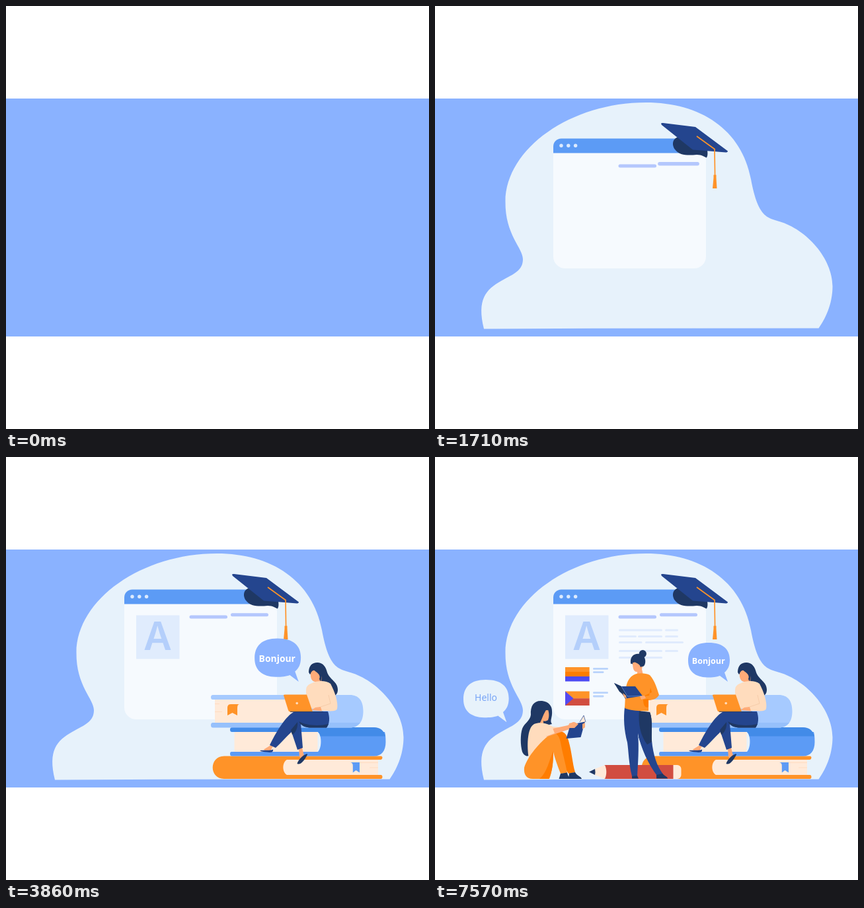
These frames come from a looping animation (640x640 px, 10 s). An HTML page with a canvas:

```html
<!DOCTYPE html>
<html lang="en">
<head>
<meta charset="utf-8">
<title>Language learning</title>
<style>
  html, body { margin: 0; width: 100%; height: 100%; overflow: hidden; background: #fff; }
  canvas { display: block; width: 640px; height: 640px; }
</style>
</head>
<body>
<canvas id="stage" width="640" height="640"></canvas>
<script>
const ctx = document.getElementById('stage').getContext('2d');

const SKY = '#8ab2ff', MIST = '#e7f2fb', WHITE = '#f6fafe';
const BLUE = '#5c9bf5', DEEP_BLUE = '#428be8', PALE_BLUE = '#a6caff';
const NAVY = '#24458e', INK = '#1f3864';
const ORANGE = '#ff9328', DARK_ORANGE = '#ff7d00', RED = '#d14d40', VIOLET = '#544af0';
const PAPER = '#ffead9', CREAM = '#ffdcbd', SKIN = '#ffab78';
const BAR = '#b4c7fd', TEXT_BAR = '#e0ebfd';

const shape = (color, d) => { ctx.fillStyle = color; ctx.fill(new Path2D(d)); };
const line = (color, width, d) => {
  ctx.strokeStyle = color;
  ctx.lineWidth = width;
  ctx.stroke(new Path2D(d));
};
const box = (color, x, y, w, h, r = 0) => {
  ctx.fillStyle = color;
  ctx.beginPath();
  ctx.roundRect(x, y, w, h, r);
  ctx.fill();
};
const dot = (color, x, y, r) => {
  ctx.fillStyle = color;
  ctx.beginPath();
  ctx.arc(x, y, r, 0, Math.PI * 2);
  ctx.fill();
};
const label = (text, color, font, x, y) => {
  ctx.font = font;
  ctx.fillStyle = color;
  ctx.textAlign = 'center';
  ctx.fillText(text, x, y);
};
const textRow = (y, ...spans) => {
  for (const [from, to] of spans) box(TEXT_BAR, from, y, to - from, 3, 1.5);
};

function cloud() {
  shape(MIST, `M74 488.5C63 444 77 429 100 416C120 405 133 400 133 383C133 366 106 346 106.5 296
    C107 215 206 146 319 146C402 146 464 187 478 262C489 322 504 320 521 326
    C562 338 601.5 382 601.5 424C601.5 452 590 474 580.5 487.5L240 487.7Z`);
}

function browser() {
  box(WHITE, 179, 200.5, 231, 196.5, [12, 12, 18, 18]);
  box(BLUE, 179, 200.5, 231, 22, [12, 12, 0, 0]);
  for (const x of [191, 201.8, 212.6]) dot('#dceafe', x, 211.3, 2.7);
}

function cap() {
  shape(INK, `M369 198C359 200 358 210 363 217C370 227 384 226 396 225C404 225 407 228 411 229.5
    C413 226 412.5 222 412 218L390 216Z`);
  shape(NAVY, 'M342 178Q342.5 176.5 345 177L394 183L443 219.5Q443 221.8 440 221.5L390 217.5L343 180Z');
  line(ORANGE, 1.7, 'M396 197L423 216.5L423.6 257');
  shape(ORANGE, 'M421.5 255.5H425.5V260L426.5 276H420L421.5 260Z');
}

function letterCard() {
  box('#e0ecfd', 197, 239.5, 65.5, 66);
  label('A', '#b4cffb', '600 59px Inter, sans-serif', 229.5, 292);
}

function paragraphTop() {
  textRow(260.5, [278, 344], [348, 368]);
  textRow(270, [278, 305], [307, 344], [348, 368]);
  textRow(279, [278, 313.5], [318, 376]);
}

function paragraphBottom() {
  textRow(292, [278, 344], [348, 368]);
  textRow(302, [278, 344]);
}

function orangeBook() {
  shape(ORANGE, 'M330 452.5H567Q569.5 452.5 569.5 455T567 458H428V481H567Q569.5 481 569.5 484T567 487H330C307 487 307 452.5 330 452.5Z');
  shape(PAPER, 'M425 458H563V481H425C417.5 477 417.5 462 425 458Z');
  line('#ffd6b8', 0.7, 'M535 462.5H563M550 470H563');
  shape(BLUE, 'M521 462H535V477.5L529.5 474L524.8 477.5V467C524.8 464 523.5 462.5 521 462Z');
}

function blueBook() {
  box(PAPER, 345.5, 415, 126, 32);
  shape(BLUE, 'M342 446H472C478 440 478 421 472 416H573Q574.5 421 574.5 431C574.5 445 568 452.5 557 452.5H342Q339 452.5 339 449T342 446Z');
  shape(DEEP_BLUE, 'M342 409H557C566 409 572 414 574 422.5H475.5Q474.5 418 472 416H342Q339 416 339 412.5T342 409Z');
}

function lightBook() {
  box(PAPER, 316, 366, 128, 37);
  shape(PALE_BLUE, 'M313 360H520C534 360 540.5 369 540.5 384.5S534 409.5 520 409.5H440V402C447 396 447 373 440 367H313Q310 367 310 363.5T313 360Z');
  shape('#96c0fb', 'M313 402H536C532 407 527 409.5 520 409.5H313Q310 409.5 310 405.7T313 402Z');
  line('#ffd6b8', 0.7, 'M316 373.5H323M316 385.5H327');
  shape(ORANGE, 'M353 374H340C336 374 335 377 335 380V391L342.5 387L350 391V380C350 376 351 374 353 374Z');
}

function laptopWoman() {
  shape(INK, `M458 326C458 315 464 310.5 472 311C480 311.5 484 318 486 326C490 337 502 340 502 352
    C502 358 499 361 496 361L474 342Z`);
  shape(SKIN, 'M405 435L400 445C396 446 392 445 390 442.5L399 437ZM443 441L448 440L451 452L446 457L444 453Z');
  shape(NAVY, 'M384 444C390 443 398 445 404 442.5C405 447 400 447.5 395 446.5C390 446 386 446 384 444Z');
  shape(INK, 'M455.5 449C449 451 442 458 440.5 464C446 467 453 457 456 450Z');
  shape(NAVY, 'M430 410L441 443L449 440L446 403C448 408 456 409.5 462 409.5H485C490 404 490 393 487 385H437C424 390 407 419 399 436L408 440C416 433 424 423 432 416Z');
  shape(INK, 'M443 400C446 407 454 409.5 462 409.5H485L488 404C474 407 456 407 443 400ZM431 413L441 401C442 409 438 418 433 420Z');
  shape(SKIN, 'M463 324C470 320 477 321 478 328L477 341C474 345 469 345 468 340C463 340 460 334 461 327Z');
  shape(INK, 'M459 329C458 317 463 311 472 312C481 313 481 322 479 327L476 340L474 336C477 329 470 326 464 321Z');
  shape(CREAM, 'M463 342C471 338 485 338 491 343C497 354 503 371 501 381C499 386 488 384 478 384L461 380C456 373 452 354 455 348Q457 344 463 342Z');
  line('#f3c8a5', 0.8, 'M488 360L491 373L476 378');
  shape(SKIN, 'M476 378L468 379L462 383L478 384.5Z');
  shape(ORANGE, 'M420 360.5Q420 359.5 422 359.5H455L464 385.5H430Q428 385.5 427 383Z');
  dot('#ffdcbd', 440.2, 372.6, 1.8);
  line(INK, 0.9, 'M430 385.4H480');
}

function bubble(color) {
  shape(color, `M414 281C436 281 446 291 446 307C446 316 443 322 438 326L443 340L431 331
    C426 333 420 333.5 412 333.5C393 333 383 324 383 308C383 291 393 281 414 281Z`);
}

function bonjour() {
  bubble(SKY);
  label('Bonjour', '#fff', "600 extra-condensed 12.5px 'Noto Sans', 'Open Sans', sans-serif", 413.7, 313);
}

function hello() {
  ctx.save();
  ctx.translate(43, 337);
  ctx.scale(1.09, 1.09);
  ctx.translate(-383, -281);
  bubble(MIST);
  ctx.restore();
  label('Hello', '#78a5f6', "500 extra-condensed 14px 'Noto Sans', 'Open Sans', sans-serif", 77, 369);
}

function pencil() {
  box(PAPER, 350, 466, 22.5, 21, [0, 6, 6, 0]);
  box(RED, 256, 466, 104.5, 21);
  shape(PAPER, 'M241 472.3L257 466C260 472 260 481 257 487L241 480.7Z');
  shape(INK, 'M233 476.5L242 472Q243 476.5 242 481Z');
}

function standingWoman() {
  dot(INK, 314.3, 297.7, 5.6);
  shape(INK, 'M309 386H325C330 398 327 418 328 431L320 437Z');
  shape(NAVY, `M287 378L311 384C313 395 307 407 312 418C317 434 329 458 345 480L336 482
    C323 465 312 442 307 418C309 440 307 464 306 483H298C293 463 293 446 291 432C286 413 285 396 287 378Z`);
  shape(NAVY, 'M308 390L321 390L328 429C330 451 336 468 345 480L336 482C324 466 315 444 308 424Z');
  shape(INK, 'M309 384L325 386C330 398 327 418 328 431L321 435C311 422 307 404 309 384Z');
  shape(INK, 'M298 483L306 482L308 486.5H298ZM335 481L344 479C348 483 352 484 352 486.5H335Z');
  shape(INK, 'M296 312C295 302 301 297 309 298C318 299 320 309 317 315C314 319 309 318 304 316Z');
  shape(SKIN, 'M299 311L311 309C315 311 314 318 313 321L315 330L306 332L306 325C301 326 299 320 299 311Z');
  shape(INK, 'M296 313C299 301 307 300 312 305L315 316L311 318C310 313 305 312 302 310Z');
  shape(ORANGE, `M300 330C307 326 319 327 325 330C333 339 336 351 339 360C336 366 329 368 323 368L323 384
    C312 385 297 384 287 380L288 361C288 349 290 336 300 330Z`);
  shape(DARK_ORANGE, 'M315 367L323 366L323 378C318 381 315 375 315 367ZM326 349L328 356L315 362L324 361Z');
  shape(NAVY, 'M271 342L282 347L303 347L314 361.5L288 365.5L283 358Z');
  shape(INK, 'M271 342L282 347L291 362L288 365.5Q285 359 279 355Z');
  line('#7fa9ee', 0.6, 'M282 347L291 362L314 361.5');
  shape(SKIN, 'M310 362L317 361L319 365L312 367ZM284 357L289 361L290 366L286 363Z');
}

function flagStripes() {
  box(ORANGE, 197, 318, 36.7, 7.5);
  box(DARK_ORANGE, 197, 325, 36.7, 7.5);
  box('#4d4bf3', 197, 332, 36.7, 7.5);
}

function flagTriangle() {
  box(ORANGE, 197, 354.5, 36.7, 11);
  box(RED, 197, 365.3, 36.7, 10.7);
  shape(VIOLET, 'M197 354.5L209.5 365.3L197 376Z');
}

const flagLines = y => () => {
  box('#b9d3fb', 239, y, 23, 2.8, 1.4);
  box('#b9d3fb', 239, y + 5.3, 16.5, 2.8, 1.4);
};

function readingGirl() {
  shape(INK, `M145 390C144 376 150 368 162 369C172 370 177 377 177 384C178 394 173 399 177 404L160 408L150 407
    C142 422 145 438 144 449C142 455 135 453 132 446C129 436 129 420 132 411C135 403 144 399 145 390Z`);
  shape(SKIN, 'M160 381L170 380C173 386 173 393 171 398C168 400 165 400 164 399L164 407L152 407Z');
  shape(INK, 'M147 388C149 374 160 371 169 376C174 380 173 384 168 383C164 389 163 394 159 402L150 404Z');
  shape(CREAM, 'M150 404C159 401 171 403 178 408L190 409L188 420L162 430L142 456C139 439 139 410 150 404Z');
  shape(DARK_ORANGE, 'M179 420C190 411 198 415 202 429C207 446 208 464 212 477L202 479C192 463 184 450 179 440Z');
  shape(ORANGE, `M148 487C138 487 134 480 135 470C140 453 159 431 174 420C182 414 188 421 190 432
    C193 449 198 465 200 478L190 479C185 466 181 455 179 446C179 461 177 477 173 487Z`);
  shape(DARK_ORANGE, 'M179 445C179 461 178 476 172 487H158C170 477 172 460 179 445Z');
  shape(INK, 'M190 479L200 477.5C201 483 204 485 203 487H187.5ZM203 478.5L212 477C215 483 221 483 222 487H202Z');
  shape(SKIN, 'M178 411L201 406L209 401L216 404L212 409L185 418L170 423L155 422Z');
  shape(CREAM, 'M151 407L163 408L178 410L181 418L162 425L151 422Z');
  shape(PAPER, 'M219 401L225 391L228 401Z');
  line(NAVY, 0.7, 'M219 401L225 391L228 401');
  shape(NAVY, 'M205 405L227 400.5L220.5 424L198.5 426Z');
  shape(SKIN, 'M203 403L211 401L217 404L211 410L202 410ZM223 404L227 402L227 409L223 412Z');
}

// Parts in painting order: turn in the sequence, scaling anchor, overshoot, drawing.
const parts = [
  [0, 336.5, 317, 1.05, cloud],
  [1, 294.5, 298.5, 1.05, browser],
  [2, 392.5, 226, 1.1, cap],
  [3, 306.3, 242, 1.1, () => box(BAR, 277.5, 239.5, 57.5, 5, 2.5)],
  [4, 368.5, 238.7, 1.1, () => box(BAR, 340, 236.2, 57, 5, 2.5)],
  [5, 229.7, 272.5, 1.1, letterCard],
  [13, 327, 271, 1.06, paragraphTop],
  [14, 323, 298, 1.06, paragraphBottom],
  [6, 441, 469.7, 1.1, orangeBook],
  [7, 456.7, 430.7, 1.1, blueBook],
  [9, 425.3, 384.7, 1.1, lightBook],
  [8, 443, 465, 1.1, laptopWoman],
  [10, 445, 339.5, 1.11, bonjour],
  [11, 372.5, 487, 1.1, pencil],
  [15, 215.4, 328.7, 1.06, flagStripes],
  [16, 250.5, 323, 1.1, flagLines(319)],
  [17, 197, 376, 1.06, flagTriangle],
  [18, 250.5, 359.3, 1.1, flagLines(355.3)],
  [12, 305, 487.5, 1.1, standingWoman],
  [19, 179.5, 487.5, 1.1, readingGirl],
  [20, 112, 401, 1.06, hello],
];

const LOOP = 10000, TICK = 1000 / 14;
const GROW = 3, HOLD = 4.03, SETTLE = 4.5;

function popScale(age, peak) {
  if (age <= 0) return 0;
  if (age < GROW) return peak * age / GROW;
  if (age < HOLD) return peak;
  if (age < SETTLE) return peak + (1 - peak) * (age - HOLD) / (SETTLE - HOLD);
  return 1;
}

function render(time) {
  const tick = Math.floor((time % LOOP + 5) / TICK);
  ctx.fillStyle = '#fff';
  ctx.fillRect(0, 0, 640, 640);
  ctx.save();
  ctx.beginPath();
  ctx.rect(0, 140, 640, 360);
  ctx.clip();
  ctx.fillStyle = SKY;
  ctx.fillRect(0, 140, 640, 360);
  for (const [turn, x, y, peak, draw] of parts) {
    const start = turn * 5 + Math.min(1, turn / 15);
    const scale = popScale(tick - start, peak);
    if (!scale) continue;
    ctx.save();
    ctx.translate(x, y);
    ctx.scale(scale, scale);
    ctx.translate(-x, -y);
    draw();
    ctx.restore();
  }
  ctx.restore();
}

const origin = performance.now();
function loop() {
  render(performance.now() - origin);
  requestAnimationFrame(loop);
}
loop();
</script>
</body>
</html>
```
